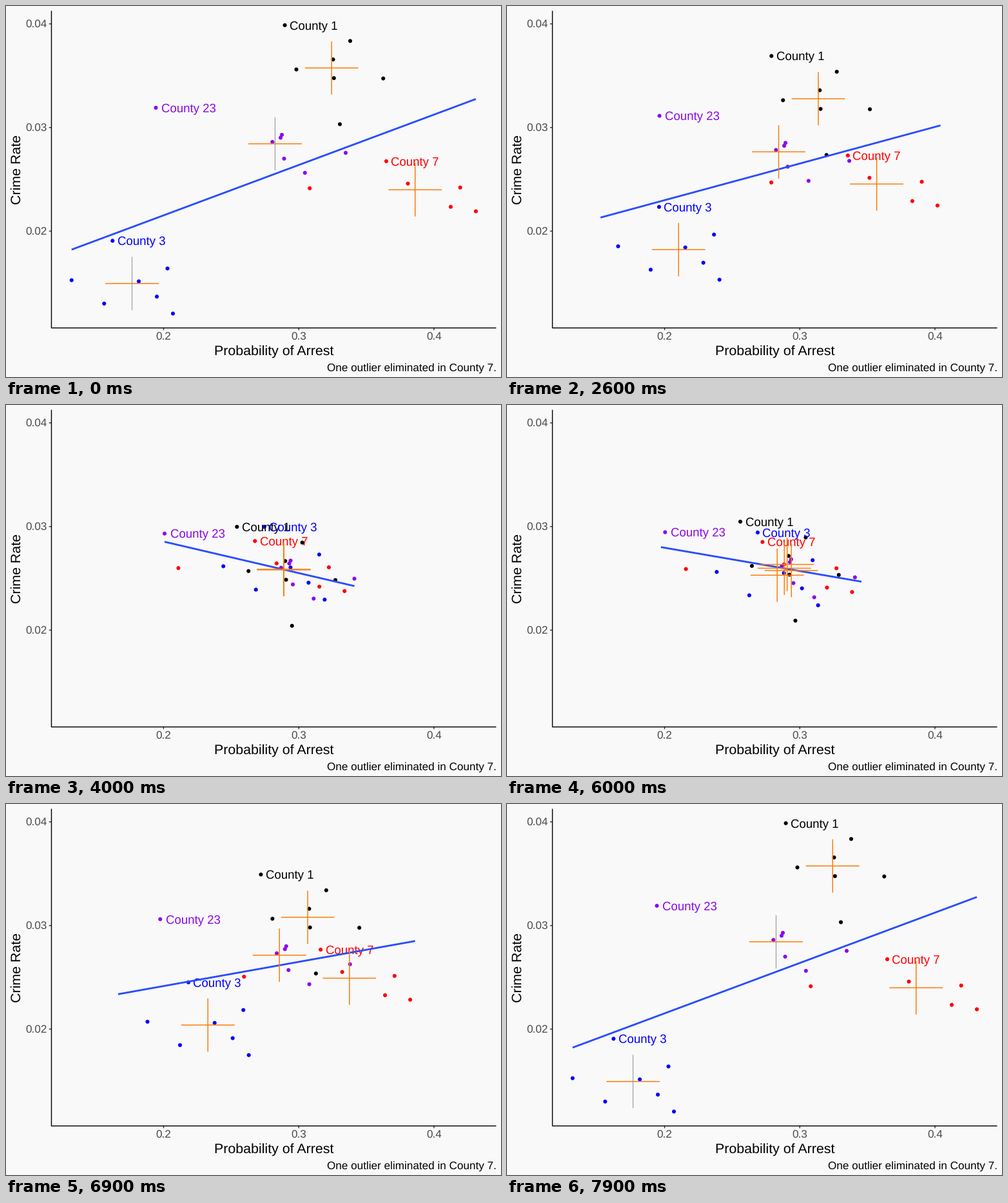
These frames come from a looping animation (768 px wide and 576 px high, 8 s). A matplotlib script:

```python
import numpy as np
import matplotlib.pyplot as plt
from matplotlib.animation import FuncAnimation
from matplotlib.patches import Circle

plt.rcParams["font.family"] = "Liberation Sans"
plt.rcParams["text.hinting"] = "none"
plt.rcParams["toolbar"] = "None"

W, H, DPI = 768, 576, 96
FRAMES, STEP_MS = 80, 100
MOVE = 20  # steps between the raw and the centred layout

BACK = "#f9f9f9"
ORANGE = "#ff7b08"
GRAY = "#8f8f8f"
TREND = "#2a4dff"
ARM = 41.4

# Points in stage pixels; the first of each county carries the label.
COUNTIES = [
    ("County 1", "#000000", 75.0 - 0.3,
     [(432.6, 29.8), (534, 54.3), (507.5, 83), (450.5, 98.5),
      (508.8, 112), (585.3, 112.5), (518, 183.5)]),
    ("County 3", "#0000ff", 75.0 - 0.3,
     [(165.3, 364.5), (101.8, 425.7), (152.3, 462), (206, 427.5),
      (250.5, 407.5), (234, 451.2), (259, 477.5)]),
    ("County 7", "#ff0000", 75.0 - 0.3,
     [(590, 241), (623.5, 275.7), (704.7, 281.8), (690, 311.8),
      (729, 318.7), (471.2, 283)]),
    ("County 23", "#8b08ee", 85.1,
     [(232.5, 158), (428, 200), (426, 204.5), (413.3, 211),
      (431.5, 237), (527, 228), (463.8, 259)]),
]


def px(width):
    """Line width in points for a width in pixels."""
    return width * 72 / DPI


def fit_ends(pts):
    """End points of the least-squares line across the data range."""
    slope, base = np.polyfit(pts[:, 0], pts[:, 1], 1)
    x = np.array([pts[:, 0].min(), pts[:, 0].max()])
    return np.column_stack([x, slope * x + base])


fig = plt.figure(figsize=(W / DPI, H / DPI), dpi=DPI, facecolor=BACK)
ax = fig.add_axes([0, 0, 1, 1])
ax.set_xlim(0, W)
ax.set_ylim(H, 0)
ax.axis("off")


def stroke(xs, ys, color, width, z):
    line, = ax.plot(xs, ys, color=color, lw=px(width), zorder=z,
                    solid_capstyle="butt", snap=False)
    return line


def write(x, y, s, size, color="black", ha="left", z=1, **kw):
    return ax.text(x, y, s, fontsize=size, color=color, ha=ha,
                   va="baseline", zorder=z, **kw)


# Axes, ticks and titles
for value, x in (("0.2", 244.5), ("0.3", 454.3), ("0.4", 664)):
    stroke([x, x], [499.5, 503.3], "#333333", 1.42, 1)
    write(x, 519, value, 12.8, "#4a4a4a", "center")
for value, y in (("0.04", 27.7), ("0.03", 188.7), ("0.02", 349.5)):
    stroke([66.8, 70.5], [y, y], "#333333", 1.42, 1)
    write(63.4, y + 6.2, value, 12.8, "#4a4a4a", "right")
stroke([70.5, 70.5, 760.5], [7.5, 499.8, 499.8], "black", 1.42, 1)
write(415.5, 542, "Probability of Arrest", 16, ha="center")
ax.text(22.5, 254, "Crime Rate", fontsize=16, rotation=90,
        ha="right", va="center", rotation_mode="default").set_visible(False)
write(22.5, 254, "Crime Rate", 16, ha="center", rotation=90,
      rotation_mode="anchor")
write(760.5, 566, "One outlier eliminated in County 7.", 12.8, ha="right")


class County:
    def __init__(self, name, color, width, pts):
        self.pts = np.array(pts, float)
        self.mean = self.pts.mean(axis=0)
        self.pad = 0.1 * width
        self.dots = [ax.add_patch(Circle(p, 3.05, fc=color, ec="none", zorder=2))
                     for p in pts]
        self.label = write(0, 0, name, 14, color, z=3)
        self.bar = stroke([], [], ORANGE, 1.5, 5)
        self.post = stroke([], [], ORANGE, 1.5, 5)
        self.faint = name in ("County 3", "County 23")

    def place(self, t):
        shift = t * (centre - self.mean)
        for dot, p in zip(self.dots, self.pts + shift):
            dot.center = p
        x, y = self.pts[0] + shift
        self.label.set_position((x + self.pad, y + 6.8))
        x, y = self.mean + shift
        self.bar.set_data([x - ARM, x + ARM], [y, y])
        self.post.set_data([x, x], [y - ARM, y + ARM])
        thin = self.faint and t == 0
        self.post.set_color(GRAY if thin else ORANGE)
        self.post.set_linewidth(px(1.0 if thin else 1.5))


counties = [County(*c) for c in COUNTIES]
raw = np.vstack([c.pts for c in counties])
centre = raw.mean(axis=0)
centred = np.vstack([c.pts - c.mean + centre for c in counties])
ends_raw, ends_centred = fit_ends(raw), fit_ends(centred)
trend = stroke([], [], TREND, 2.85, 4)


def progress(i):
    """0 for raw data, 1 for data centred on the common mean."""
    if i < 60:
        return min(max(i - 20, 0), MOVE) / MOVE
    return (79 - i) / MOVE


def update(i):
    t = progress(i)
    for c in counties:
        c.place(t)
    trend.set_data(*((1 - t) * ends_raw + t * ends_centred).T)
    return []


anim = FuncAnimation(fig, update, frames=FRAMES, interval=STEP_MS,
                     init_func=lambda: update(0), repeat=True,
                     repeat_delay=0, blit=False)
plt.show()
```
